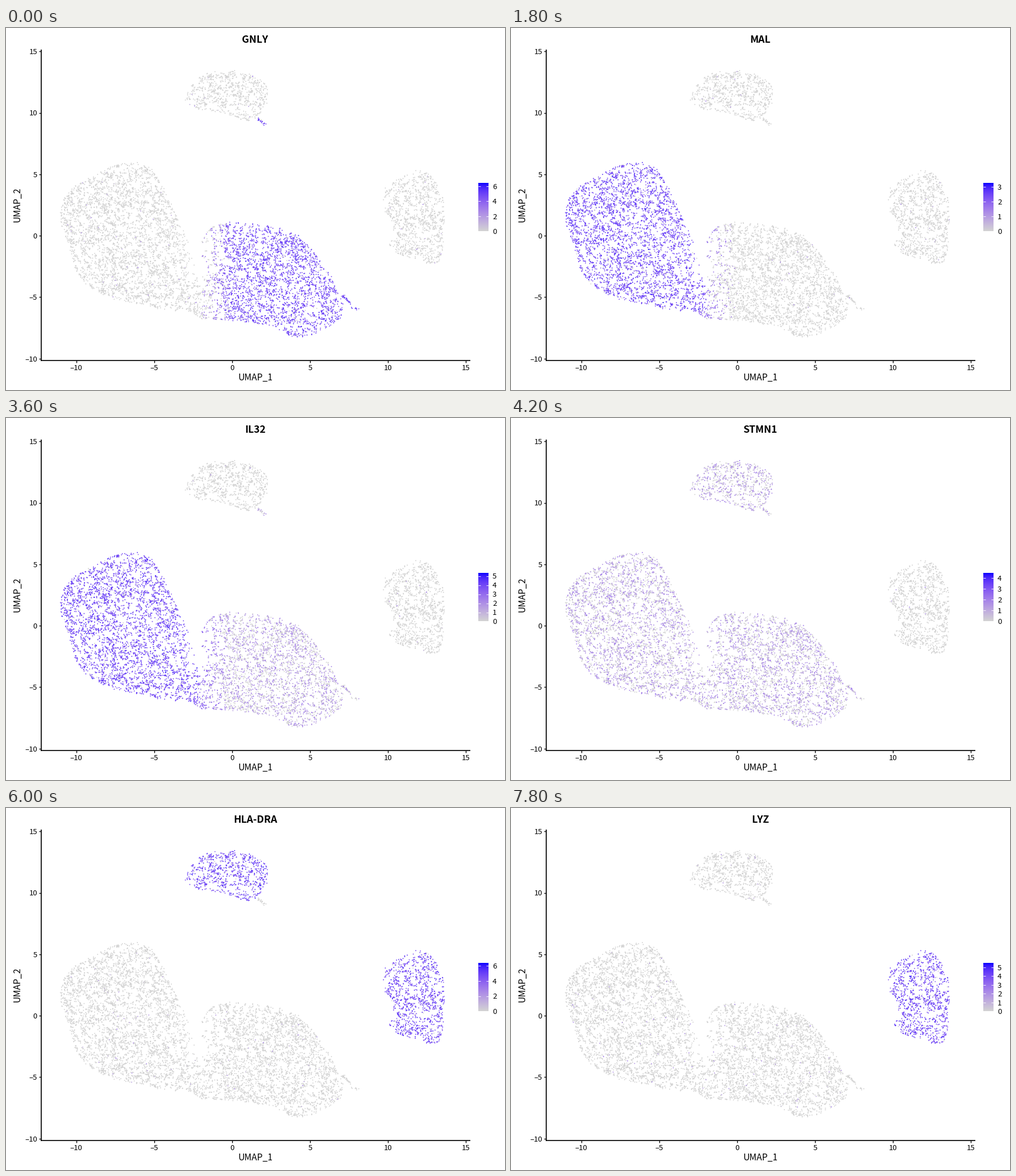
Write a matplotlib script that moves like this. It is 878 px wide and 638 px high and loops after 8 s.

```python
import numpy as np
import matplotlib.pyplot as plt
from matplotlib.animation import FuncAnimation
from matplotlib.collections import LineCollection
from matplotlib.path import Path

W, H, DPI = 878, 638, 64
PT = 72 / DPI  # points per pixel
FONT = "Noto Sans CJK JP"
STEP_MS, HOLD = 200, 3
FRAMES = 40
rng = np.random.default_rng(7)

# key points of each cluster's outline, in pixels
OUTLINES = {
    "T": [(98, 330), (115, 288), (180, 248), (225, 239), (262, 258), (296, 325),
          (320, 385), (338, 492), (230, 485), (142, 452), (112, 385)],
    "N": [(342, 390), (372, 347), (460, 350), (526, 378), (578, 455), (588, 510),
          (515, 545), (470, 525), (400, 515), (332, 504), (348, 450)],
    "B": [(318, 118), (350, 82), (407, 78), (455, 98), (455, 140), (425, 163),
          (390, 152), (330, 139)],
    "M": [(667, 290), (690, 267), (735, 253), (768, 300), (769, 365), (760, 412),
          (725, 408), (677, 388), (683, 345), (668, 325)],
}

# gene, scale maximum, clusters it marks: upper case strong, lower case weak
GENES = [
    ("GNLY", 6.38, "N"), ("NKG7", 6.2, "N"), ("GZMB", 5.2, "N"),
    ("MAL", 3.26, "T"), ("CD79A", 5.1, "B"), ("S100A8", 8.13, "M"),
    ("IL32", 5.3, "Tn"), ("STMN1", 4.42, "tnb"), ("TYROBP", 5.4, "NM"),
    ("CD74", 6.45, "tnBM"), ("HLA-DRA", 6.3, "BM"), ("S100A9", 6.64, "M"),
    ("CST3", 5.6, "M"), ("LYZ", 5.46, "M"),
]
STRONG, WEAK, STRAY = (0.93, 0.74), (0.55, 0.35), (0.01, 0.3)  # share, level


def lab_ramp(t):
    """Light grey to blue, mixed in Lab space."""
    t = np.asarray(t)[:, None]
    lab = (1 - t) * np.array([84.56, 0, 0]) + t * np.array([32.3, 79.19, -107.86])
    fy = (lab[:, 0] + 16) / 116
    f = np.stack([fy + lab[:, 1] / 500, fy, fy - lab[:, 2] / 200], 1)
    xyz = np.where(f > 6 / 29, f**3, 3 * (6 / 29)**2 * (f - 4 / 29))
    xyz = xyz * [0.9505, 1, 1.089]
    m = np.array([[3.2406, -1.5372, -0.4986],
                  [-0.9689, 1.8758, 0.0415],
                  [0.0557, -0.2040, 1.0570]])
    lin = np.clip(xyz @ m.T, 0, 1)
    gamma = 1.055 * np.maximum(lin, 0.0031308)**(1 / 2.4) - 0.055
    return np.clip(np.where(lin > 0.0031308, gamma, 12.92 * lin), 0, 1)


def smooth(points, n=10):
    """Closed Catmull-Rom curve through the points."""
    p1 = np.array(points, float)
    p0, p2, p3 = (np.roll(p1, k, axis=0) for k in (1, -1, -2))
    t = np.linspace(0, 1, n, endpoint=False)[None, :, None]
    a, b, c, d = (p[:, None] for p in (p0, p1, p2, p3))
    curve = b + 0.5 * t * (c - a + t * (2 * a - 5 * b + 4 * c - d
                                        + t * (3 * (b - c) + d - a)))
    return curve.reshape(-1, 2)


def bump(p, cx, cy, rx, ry):
    return np.exp(-((p[:, 0] - cx) / rx)**2 - ((p[:, 1] - cy) / ry)**2)


def density(p):
    bridge = 0.9 * bump(p, 340, 405, 28, 65)
    hollow = 0.9 * bump(p, 423, 144, 17, 9)
    return 1 - bridge - hollow


def fill(outline):
    """Spread cells over an outline, half of them close to another cell."""
    curve = smooth(outline)
    x, y = curve.T
    area = abs(x @ np.roll(y, -1) - y @ np.roll(x, -1)) / 2
    n = int(0.088 * area)
    shape = Path(curve)
    seeds = rng.uniform(curve.min(0), curve.max(0), (3 * n, 2))
    seeds = seeds[shape.contains_points(seeds)]
    seeds = seeds[rng.random(len(seeds)) < density(seeds)][:n // 2]
    near = seeds[rng.integers(len(seeds), size=n // 2)]
    near = near + rng.normal(0, 2, near.shape)
    near = near[shape.contains_points(near, radius=2)]
    rim = curve[rng.integers(len(curve), size=n // 25)]
    rim = rim + rng.normal(0, 1.2, rim.shape)
    rim = rim[rng.random(len(rim)) < density(rim)]
    return np.vstack([seeds, near, rim])


def streak(start, end, n):
    t = rng.random((n, 1))
    return np.array(start) * (1 - t) + np.array(end) * t + rng.normal(0, 1.2, (n, 2))


groups = {key: fill(outline) for key, outline in OUTLINES.items()}
groups["N"] = np.vstack([groups["N"],
                         streak((591, 470), (606, 485), 28),
                         streak((606, 491), (621, 496), 8),
                         streak((443, 161), (455, 169), 20)])
cells = np.vstack(list(groups.values()))
kind = np.repeat(list(groups), [len(g) for g in groups.values()])
order = rng.permutation(len(cells))
cells, kind = cells[order], kind[order]
X, Y = cells.T


def expression(marked):
    def profile(key):
        return STRONG if key in marked else WEAK if key.lower() in marked else STRAY

    share, level = np.array([profile(key) for key in kind]).T
    # N cells turn into T cells towards the bridge
    mix = np.where(kind == "N", np.clip((395 - X) / 70, 0, 1), 0)
    t_share, t_level = profile("T")
    share = share + mix * (t_share - share)
    level = level + mix * (t_level - level)
    value = np.clip(rng.normal(level, 0.09), 0.08, 1)
    return np.where(rng.random(len(X)) < share, value, 0)


colors = [lab_ramp(expression(marked)) for _, _, marked in GENES]

fig = plt.figure(figsize=(W / DPI, H / DPI), dpi=DPI, facecolor="white")
ax = fig.add_axes([0, 0, 1, 1])
LEFT, RIGHT, BOTTOM, TOP = 831, 849, 358.5, 273.7
ax.imshow(lab_ramp(np.linspace(0, 1, 100))[:, None], origin="lower",
          extent=(LEFT, RIGHT, BOTTOM, TOP), aspect="auto", interpolation="bilinear")
ax.set_xlim(0, W)
ax.set_ylim(H, 0)
ax.axis("off")


def label(x, y, s, px, **kw):
    return ax.text(x, y, s, fontsize=px * PT, family=FONT, color="black", **kw)


def rule(x, y, width):
    ax.plot(x, y, color="black", lw=width * PT, solid_capstyle="butt")


rule([62, 62], [38, 586.8], 1.7)
rule([61.2, 817], [586, 586], 1.7)
for v in range(-10, 16, 5):
    text = str(v).replace("-", "\u2013")
    tx, ty = 397.8 + 27.42 * v, 366.1 - 21.66 * v
    rule([tx, tx], [586, 590], 1.4)
    rule([58, 62], [ty, ty], 1.4)
    label(tx, 602.7, text, 13.2, ha="center")
    label(55, ty + 4.9, text, 13.2, ha="right")
label(438.5, 620.5, "UMAP_1", 15.6, ha="center")
label(24.5, 311.5, "UMAP_2", 15.8, ha="center", rotation=90, rotation_mode="anchor")

dots = ax.scatter(X, Y, s=(1.9 * PT)**2, c=colors[0], linewidths=0)
title = label(438.5, 26, "", 17.5, ha="center", weight="bold")
marks = [label(856, 0, "", 13.2) for _ in range(6)]
ticks = LineCollection([], colors="white", linewidths=0.9 * PT)
ax.add_collection(ticks, autolim=False)


def draw(i):
    k = i // HOLD
    name, top, _ = GENES[k]
    title.set_text(name)
    dots.set_facecolors(colors[k])
    for mark in marks:
        mark.set_text("")
    lines = []
    step = 2 if top > 5.5 else 1
    for mark, value in zip(marks, range(0, int(top) + 1, step)):
        y = BOTTOM - (BOTTOM - TOP) * value / top
        mark.set_text(str(value))
        mark.set_y(y + 4.9)
        lines += [[(LEFT, y), (LEFT + 3.6, y)], [(RIGHT - 3.6, y), (RIGHT, y)]]
    ticks.set_segments(lines)
    return dots, title, ticks, *marks


anim = FuncAnimation(fig, draw, frames=FRAMES, interval=STEP_MS, repeat=True,
                     repeat_delay=0, blit=False)
plt.show()
```
